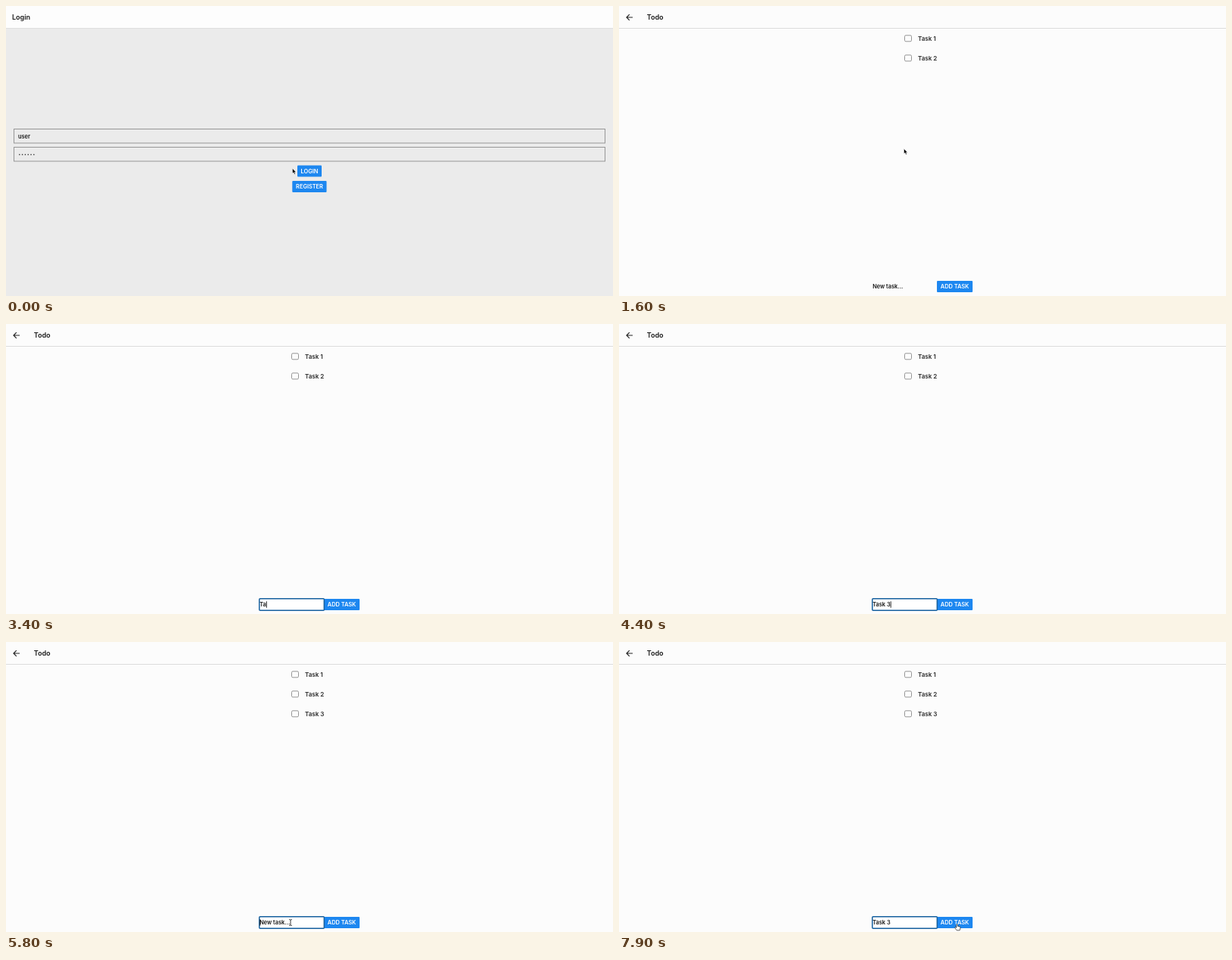
An HTML page that plays this animation: 800 by 383 pixels, repeating every 8000 ms.

```html
<!DOCTYPE html>
<html lang="en">
<head>
<meta charset="utf-8">
<title>Todo app</title>
<style>
html, body { margin: 0; width: 100%; height: 100%; overflow: hidden; background: #fcfcfc; }
svg { display: block; width: 100%; height: 100%; }
text { font: 600 7.4px Inter, "Open Sans", sans-serif; fill: #191919; white-space: pre; }
.title { font-size: 9px; }
.task { font-size: 8px; fill: #2a2a2a; }
.button rect { fill: #1d87f0; }
.button text { fill: #fff; text-anchor: middle; }
.box { fill: none; stroke: #969696; }
#cursors path { stroke-linejoin: round; }
</style>
</head>
<body>
<svg viewBox="0 0 800 383">
  <g id="login">
    <rect width="800" height="383" fill="#ebebeb"/>
    <rect width="800" height="29" fill="#fdfdfd"/>
    <path d="M0 29.5H800" stroke="#dedede"/>
    <text class="title" x="8" y="18.3">Login</text>
    <rect class="box" x="10.5" y="162.5" width="779" height="18.5"/>
    <rect class="box" x="10.5" y="186.5" width="779" height="18.5"/>
    <text x="16" y="174.6">user</text>
    <path d="M17.8 196.2h20" stroke="#222" stroke-width="1.6" stroke-linecap="round" stroke-dasharray="0 3.8"/>
    <g class="button" id="loginButton">
      <rect x="384" y="210.5" width="32" height="15" rx="1"/>
      <text x="400" y="220.8">LOGIN</text>
    </g>
    <g class="button">
      <rect x="377.3" y="231" width="45.2" height="15" rx="1"/>
      <text x="400" y="241.3">REGISTER</text>
    </g>
  </g>
  <g id="todo">
    <rect width="800" height="383" fill="#fcfcfc"/>
    <path d="M0 29.5H800" stroke="#dcdcdc"/>
    <path d="M18 15H10M13.8 11.2L10 15l3.8 3.8" fill="none" stroke="#222" stroke-width="1.2"/>
    <text class="title" x="36.7" y="18.3">Todo</text>
    <g id="tasks"></g>
    <g class="button" id="addButton">
      <rect x="419" y="363" width="47" height="15" rx="1"/>
      <text x="442.5" y="373.2">ADD TASK</text>
    </g>
    <rect id="focus" x="333.9" y="362.8" width="85.4" height="15.4" rx="1" fill="#fff" stroke="#155f9e" stroke-width="1.5"/>
    <text id="entry" x="334.2" y="373.2"></text>
    <path id="caret" d="M0 366.3v8.4" stroke="#111" stroke-width=".9"/>
  </g>
  <g id="cursors">
    <path id="arrow" d="M0 0V6.6L1.5 5.3 2.6 7.7 3.8 7.2 2.8 4.9H4.8Z" fill="#000" stroke="#fff" stroke-width=".5"/>
    <path id="beam" d="M-1.8-4Q0-4 0-3Q0-4 1.8-4M0-3V3M-1.8 4Q0 4 0 3Q0 4 1.8 4" fill="none" stroke="#222" stroke-width=".9"/>
    <path id="hand" d="M-.8 .6Q0-.5 .8 .6V2.8L3.6 3.4Q4.6 3.8 4.4 5L3.6 8.3H-.4L-2.8 5Q-2.8 3.8-1.6 4.2L-.8 4.8Z" fill="#fff" stroke="#222" stroke-width=".7"/>
  </g>
</svg>
<script>
const LOOP = 8000, STEP = 100;
const $ = id => document.getElementById(id);
const show = (id, on) => $(id).setAttribute("display", on ? "inline" : "none");
const within = (t, a, b) => t >= a && t < b;

// Pointer path: time, x, y
const path = [
  [0, 377.5, 214.5], [300, 391, 216.5], [500, 391, 216.5], [600, 389.5, 217.5],
  [900, 389.5, 217.5], [1300, 378, 101], [1400, 378, 101], [1800, 373, 276],
  [1900, 373, 276], [2300, 366, 368], [4800, 366, 368], [5100, 433, 371.5],
  [5500, 433, 371.5], [5800, 375, 370.5], [7300, 375, 370.5], [7900, 445.5, 372.5]
];
// Button opacity while pressed: time, opacity
const loginFade = [[200, 1], [400, .5], [500, .7]];
const addFade = [[5000, 1], [5200, .5], [5300, .68], [5600, 1]];
// Focus spans of the entry field and the time of each key
const spans = [
  { from: 2300, to: 5100, end: 5300, keys: [3300, 3400, 3500, 4200, 4300, 4400] },
  { from: 5800, to: LOOP, end: LOOP, keys: [6600, 6700, 6800, 6900, 7000, 7200] }
];

function track(points, t) {
  const i = points.findIndex(p => p[0] > t);
  if (i < 0) return points[points.length - 1].slice(1);
  if (i === 0) return points[0].slice(1);
  const a = points[i - 1], b = points[i];
  const k = (t - a[0]) / (b[0] - a[0]), e = k * k * (3 - 2 * k);
  return a.slice(1).map((v, j) => v + (b[j + 1] - v) * e);
}

$("tasks").innerHTML = [1, 2, 3].map(n => {
  const y = 17 + 26 * n;
  return `<g id="task${n}"><rect class="box" x="376.5" y="${y - 4.2}" width="9" height="8" rx="1.5"/>
    <text class="task" x="394" y="${y + 3.3}">Task ${n}</text></g>`;
}).join("");

function draw(t) {
  const onLogin = t < 500;
  show("login", onLogin);
  show("todo", !onLogin);
  show("task3", t >= 5300);
  $("loginButton").setAttribute("opacity", track(loginFade, t)[0]);
  $("addButton").setAttribute("opacity", track(addFade, t)[0]);

  const span = spans.find(s => within(t, s.from, s.end));
  const pressed = span ? span.keys.filter(k => k <= t) : [];
  const typed = "Task 3".slice(0, pressed.length);
  const focused = !!span && t < span.to;
  const entry = $("entry");
  entry.textContent = typed || "New task...";
  show("focus", focused);
  const since = focused ? t - (pressed.length ? pressed[pressed.length - 1] : span.from) : 0;
  show("caret", focused && since % 1000 < 500);
  const end = typed && !onLogin ? entry.getComputedTextLength() : 0;
  $("caret").setAttribute("transform", `translate(${334.8 + end})`);

  const [x, y] = track(path, t);
  const hidden = within(t, 3300, 4800) || within(t, 6600, 7300);
  const inBar = !onLogin && y > 362;
  const kind = (onLogin && x > 384) || (inBar && x >= 419) ? "hand" : inBar ? "beam" : "arrow";
  for (const id of ["arrow", "beam", "hand"]) show(id, !hidden && id === kind);
  $("cursors").setAttribute("transform", `translate(${x} ${y})`);
}

const start = performance.now();
function frame(now) {
  const t = Math.max(0, now - start) % LOOP;
  draw(Math.floor(t / STEP) * STEP);
  requestAnimationFrame(frame);
}
draw(0);
requestAnimationFrame(frame);
</script>
</body>
</html>
```
